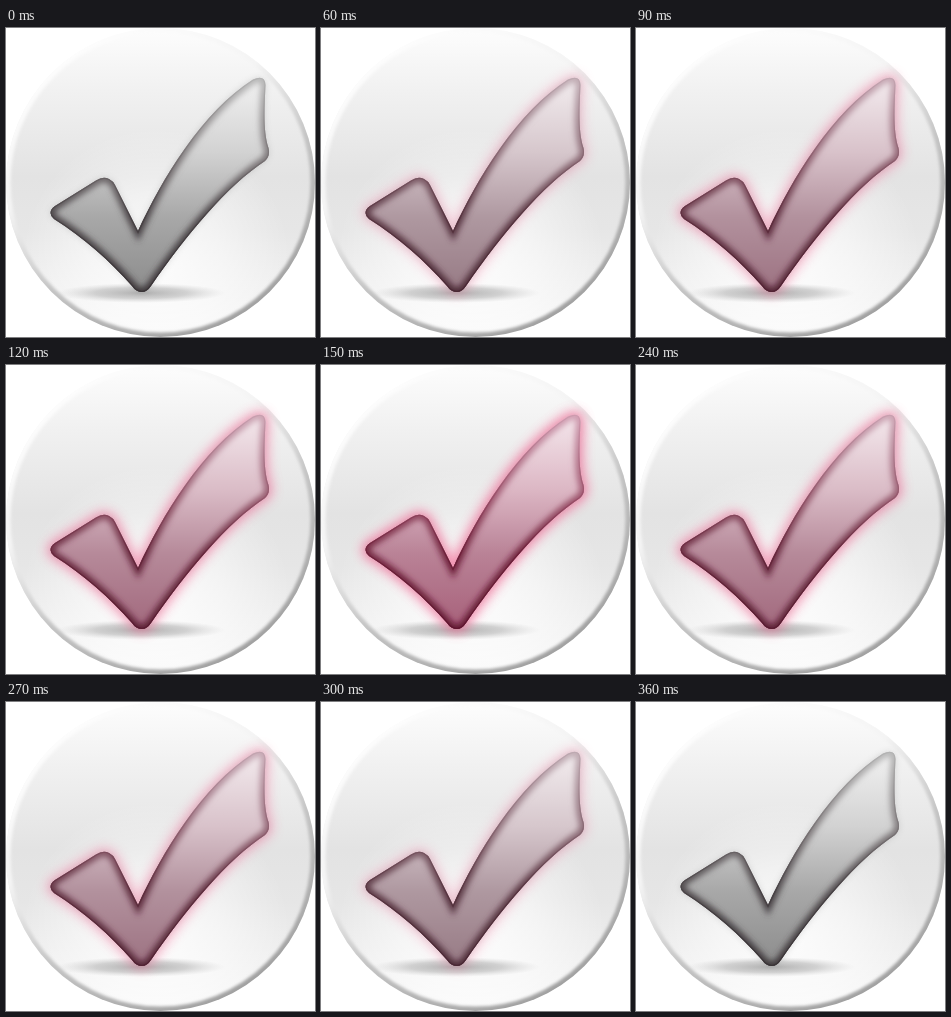
These frames come from a looping animation (309x309 px, 0.39 s). An HTML page:

```html
<!DOCTYPE html>
<html lang="en">
<head>
<meta charset="utf-8">
<title>Glowing check mark</title>
<style>
  html, body { margin: 0; width: 100%; height: 100%; overflow: hidden; background: #fff; }
  svg { display: block; width: 100vw; height: 100vh; }
  .glow { opacity: 0; animation: pulse 390ms steps(6, end) infinite; }
  /* six 30 ms steps up, six down, one step of rest */
  @keyframes pulse {
    0% { opacity: 0; }
    46.1538% { opacity: 1; }
    92.3076%, 100% { opacity: 0; }
  }
</style>
</head>
<body>
<svg viewBox="0 0 309 309">
  <defs>
    <path id="tick" d="M44.5 185Q44.5 181 49 178L90 152.500Q97 148 103 151Q107 153 109 157L132 203C156 151 196 84 247 51.500Q259 46 259.500 57C258.500 80 257 104 262.500 120Q264.500 128 259 133C221 158 181 206 145 258Q141 264 136 264Q130 264 126 258C104 233 78 210 48 191Q44.500 188 44.500 185Z"/>
    <clipPath id="inside"><use href="#tick"/></clipPath>
    <clipPath id="disc"><circle cx="154.5" cy="154.5" r="154.5"/></clipPath>

    <linearGradient id="face" x2="0" y2="1">
      <stop stop-color="#fdfdfd"/>
      <stop offset=".2" stop-color="#f1f1f1"/>
      <stop offset=".48" stop-color="#e3e3e3"/>
      <stop offset=".65" stop-color="#e6e6e6"/>
      <stop offset="1" stop-color="#f8f8f8"/>
    </linearGradient>
    <radialGradient id="shine" gradientUnits="userSpaceOnUse" cx="150" cy="235" r="135">
      <stop stop-color="#fff" stop-opacity=".85"/>
      <stop offset=".5" stop-color="#fff" stop-opacity=".5"/>
      <stop offset="1" stop-color="#fff" stop-opacity="0"/>
    </radialGradient>
    <linearGradient id="rim" x1=".2" y1="0" x2=".8" y2="1">
      <stop stop-color="#fff"/>
      <stop offset=".35" stop-color="#f4f4f4"/>
      <stop offset=".6" stop-color="#c4c4c4"/>
      <stop offset="1" stop-color="#999"/>
    </linearGradient>
    <radialGradient id="shadow">
      <stop stop-color="#888" stop-opacity=".65"/>
      <stop offset=".55" stop-color="#999" stop-opacity=".42"/>
      <stop offset="1" stop-color="#bbb" stop-opacity="0"/>
    </radialGradient>

    <linearGradient id="grayFill" x2="0" y2="1">
      <stop stop-color="#f2f2f2"/>
      <stop offset=".35" stop-color="#d2d2d2"/>
      <stop offset=".65" stop-color="#a8a8a8"/>
      <stop offset="1" stop-color="#8c8c8c"/>
    </linearGradient>
    <linearGradient id="grayEdge" gradientUnits="userSpaceOnUse" x1="0" y1="50" x2="0" y2="264">
      <stop stop-color="#b4b4b4"/>
      <stop offset=".4" stop-color="#746e70"/>
      <stop offset=".65" stop-color="#484245"/>
      <stop offset="1" stop-color="#3a3437"/>
    </linearGradient>
    <linearGradient id="pinkFill" x2="0" y2="1">
      <stop stop-color="#f6e6ec"/>
      <stop offset=".35" stop-color="#dfb2c2"/>
      <stop offset=".65" stop-color="#bd7b93"/>
      <stop offset="1" stop-color="#ad5877"/>
    </linearGradient>
    <linearGradient id="pinkEdge" gradientUnits="userSpaceOnUse" x1="0" y1="50" x2="0" y2="264">
      <stop stop-color="#d596ae"/>
      <stop offset=".4" stop-color="#a04664"/>
      <stop offset=".65" stop-color="#761a38"/>
      <stop offset="1" stop-color="#68102e"/>
    </linearGradient>

    <filter id="soft" x="-20%" y="-20%" width="140%" height="140%"><feGaussianBlur stdDeviation="3.2"/></filter>
    <filter id="halo" x="-20%" y="-20%" width="140%" height="140%"><feGaussianBlur stdDeviation="5.5"/></filter>
    <filter id="bevel" x="-10%" y="-10%" width="120%" height="120%"><feGaussianBlur stdDeviation="1.8"/></filter>
  </defs>

  <g clip-path="url(#disc)">
    <circle cx="154.5" cy="154.5" r="154.5" fill="url(#face)"/>
    <circle cx="154.5" cy="154.5" r="154.5" fill="url(#shine)"/>
    <circle cx="154.5" cy="154.5" r="154" fill="none" stroke="url(#rim)" stroke-width="8" filter="url(#bevel)"/>
  </g>
  <ellipse cx="135" cy="265" rx="84" ry="10" fill="url(#shadow)"/>

  <use href="#tick" fill="#777" opacity=".25" filter="url(#soft)"/>
  <use href="#tick" fill="url(#grayFill)"/>
  <g clip-path="url(#inside)" fill="none" stroke="url(#grayEdge)">
    <use href="#tick" stroke-width="9" filter="url(#soft)"/>
    <use href="#tick" stroke-width="2.5"/>
  </g>

  <g class="glow">
    <use href="#tick" fill="#f5769f" stroke="#f5769f" stroke-width="9" opacity=".85" filter="url(#halo)"/>
    <use href="#tick" fill="url(#pinkFill)"/>
    <g clip-path="url(#inside)" fill="none" stroke="url(#pinkEdge)">
      <use href="#tick" stroke-width="9" filter="url(#soft)"/>
      <use href="#tick" stroke-width="2.5"/>
    </g>
  </g>
</svg>
</body>
</html>
```
